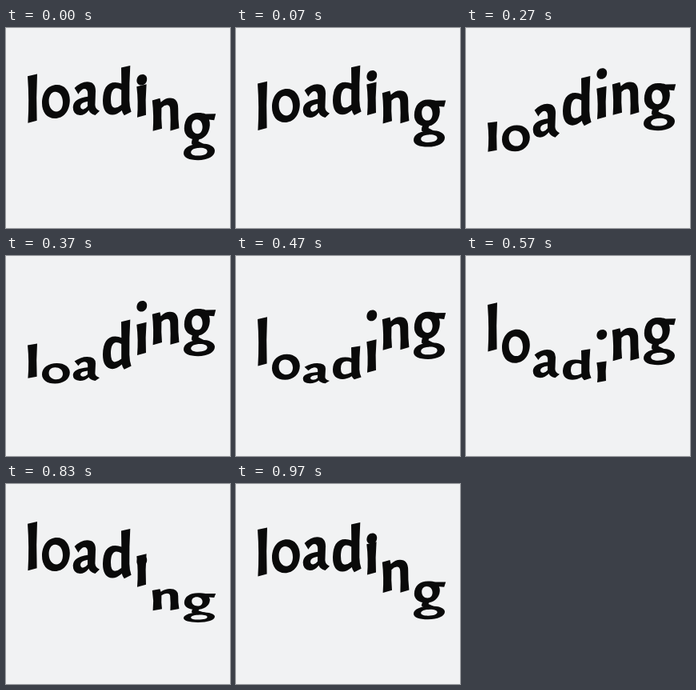
Write an HTML page that moves like this. It is 280 px wide and 250 px high and loops after 1 s.

```html
<!DOCTYPE html>
<html lang="en">
<head>
<meta charset="utf-8">
<title>loading</title>
<style>
  html, body { margin: 0; width: 100%; height: 100%; overflow: hidden; background: #f1f2f3; }
  svg { display: block; width: 100%; height: 100%; }
</style>
</head>
<body>
<svg id="stage" viewBox="0 0 280 250" role="img" aria-label="loading" fill="#0a0a0a" fill-rule="evenodd"></svg>
<script>
const NS = 'http://www.w3.org/2000/svg';
const stage = document.getElementById('stage');
const LOOP = 1000, FPS = 30, STAGGER = .0816;

// Each part is a list of outlines, drawn at its rest position.
const parts = [
  // l
  ['M27 88.6L39 86Q37.6 115 38.6 144.2L27.4 147.2Q29.2 118 27 88.6Z'],
  // o
  ['M63.6 106C73.4 106 79.8 114 79.8 125C79.8 139 71.6 148 61.3 148C51 148 45 140 45 129C45 115 53 106 63.6 106Z' +
   'M61.3 114.8C56.5 114.8 53.6 120 53.6 126.5C53.6 134 57.5 139.4 63 139.4C68.2 139.4 71 134.5 71 128C71 120 67 114.8 61.3 114.8Z'],
  // a
  ['M85.6 113.8Q93.5 106 101.4 106Q112 106 112 117.5L111.4 135Q111.6 140 117 142.5L111.5 147.8Q105 146 103.5 141.5' +
   'Q98.5 147.8 92.5 147.8Q83.7 147.3 83.7 137.8Q84 126.8 102.2 124.5L102.2 120.5Q102 114.8 97.8 114.8Q94 115.2 90.4 121.6Z' +
   'M102 130.5Q93 131.8 93 136.8Q93.3 140.4 96.5 140.4Q99.5 140 102 136.5Z'],
  // d
  ['M144 88.6L155.3 86Q154 108 154.3 130Q154.4 138 156.6 143.8L147.8 148.2Q145.5 145.5 144.8 142Q138.5 147.6 133 147.6' +
   'Q121 147 121 129.5Q121.5 107 136.5 107Q141 107 144.3 108.6Z' +
   'M144.2 116.5Q141 114.4 138 114.4Q131 115 131 128Q131 138.8 136 138.8Q140 138.6 144.2 135Z'],
  // i, stem
  ['M163.3 109.2L175.6 106.2Q174 126 175 144.6L164 147.6Q165.6 128 163.3 109.2Z'],
  // i, dot
  ['M170.6 88.2C174.2 88.2 176.2 90.8 176.2 94C176.2 98.6 173 101.8 169 101.8C165.4 101.8 163.4 99.2 163.4 96C163.4 91.4 166.6 88.2 170.6 88.2Z'],
  // n
  ['M182.8 110L192.4 107.3L193.6 112.4Q199 107 205 107Q215.2 107 215.2 120Q215 133 216.4 144.8L205.4 148' +
   'Q206 134 205.2 121Q205 115.8 201 115.8Q197.5 116 194.4 119.5Q193.8 133 195 145.2L183.6 148.4Q185 129 182.8 110Z'],
  // g: bowl with ear, link, loop
  ['M240 106C244.5 106 247.5 106.6 249.5 107.4L262.2 107.2L260.2 115.2L253.8 114.6Q255 117.8 254.8 121.4C254.2 132.5 247 139.6 238 139.6' +
   'C228.6 139.6 222.8 134 222.8 125.6C223 113 230 106 240 106Z' +
   'M238.4 114.2C234.4 114.2 232.2 118 232.2 122.6C232.2 128.2 235 132.2 239.4 132.2C243.6 132.2 245.6 128.4 245.6 123.6C245.6 118 242.6 114.2 238.4 114.2Z',
   'M234 136.5L242 137.5L240.5 141.5L249 146L240 150L232 145Q231.5 141.5 234 136.5Z',
   'M244 144.6C254 144.6 261 148 261 153.5C261 160.5 252 165.2 240 165.2C229 165.2 222 162 222 156.5C222 149.5 231.5 144.6 244 144.6Z' +
   'M243 149.8C235.6 149.8 231.2 152.2 231.2 155.4C231.2 158.2 235 159.6 240 159.6C247 159.6 251.6 157.6 251.6 154.2C251.6 151.4 248 149.8 243 149.8Z']
];

// Start phase, vertical shift, height factor, easing towards the next key.
const keys = [
  [0,      0,  1,     [.1361, .2514, .2175, .8786]],
  [.37, -39.96, 1,    [.7674, .1844, .8382, .7157]],
  [.72,    0,  1,     [.1118, .2149, .2172, .941]],
  [.87,  19.9, .602,  [.7494, .2259, .8209, .6963]],
  [1,      0,  1]
];

const cubic = (a, b, s) => 3 * (1 - s) ** 2 * s * a + 3 * (1 - s) * s * s * b + s ** 3;

function ease([x1, y1, x2, y2], x) {
  let lo = 0, hi = 1;
  for (let n = 0; n < 24; n++) {
    const mid = (lo + hi) / 2;
    if (cubic(x1, x2, mid) < x) lo = mid; else hi = mid;
  }
  return cubic(y1, y2, lo);
}

function pose(phase) {
  const k = keys.findIndex((key, n) => phase < keys[n + 1][0]);
  const [from, y0, s0, curve] = keys[k];
  const [to, y1, s1] = keys[k + 1];
  const p = ease(curve, (phase - from) / (to - from));
  return { shift: y0 + (y1 - y0) * p, scale: s0 + (s1 - s0) * p };
}

const letters = parts.map((outlines, i) => {
  const g = stage.appendChild(document.createElementNS(NS, 'g'));
  for (const d of outlines) {
    g.appendChild(document.createElementNS(NS, 'path')).setAttribute('d', d);
  }
  const box = g.getBBox();
  return { g, mid: box.y + box.height / 2, lead: (parts.length - 1 - i) * STAGGER };
});

function draw(ms) {
  // The motion advances in 30 even steps per loop.
  const t = Math.floor((ms % LOOP + 4) * FPS / 1000) / FPS;
  for (const { g, mid, lead } of letters) {
    const { shift, scale } = pose((t + lead) % 1);
    g.setAttribute('transform', `translate(0 ${mid + shift}) scale(1 ${scale}) translate(0 ${-mid})`);
  }
}

const start = performance.now();
function tick() {
  draw(performance.now() - start);
  requestAnimationFrame(tick);
}
tick();
</script>
</body>
</html>
```
